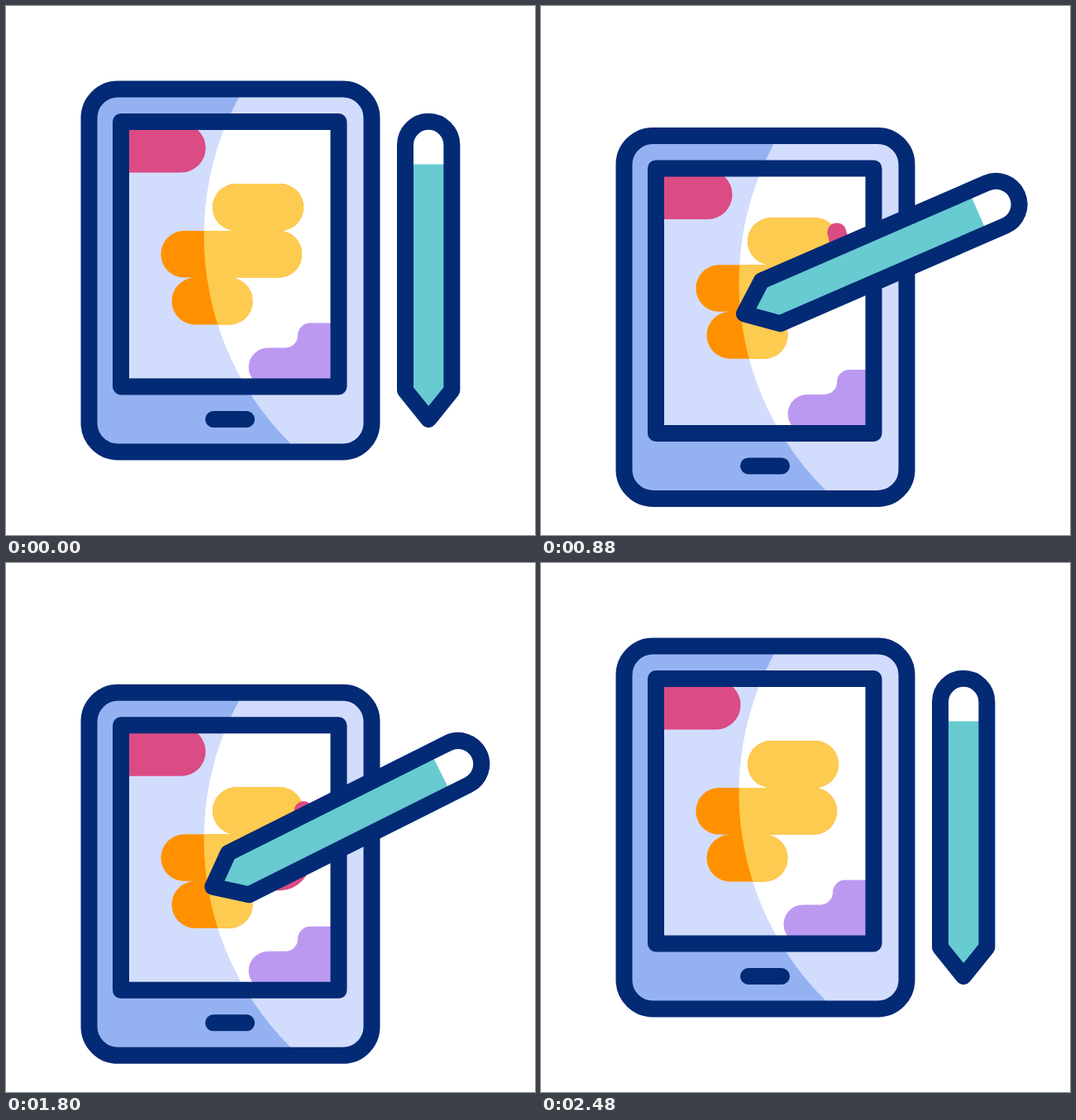
An HTML page that plays this animation: 640x640 px, repeating every 3 s.

```html
<!DOCTYPE html>
<html lang="en">
<head>
<meta charset="utf-8">
<title>Drawing tablet</title>
<style>
  html, body { margin: 0; width: 100%; height: 100%; overflow: hidden; background: #fff; }
  svg { display: block; width: 100vw; height: 100vh; }
  .line { fill: none; stroke: #032a75; stroke-width: 20; stroke-linecap: round; stroke-linejoin: round; }
</style>
</head>
<body>
<svg viewBox="0 0 640 640">
  <defs>
    <rect id="body" x="100.5" y="100.5" width="342" height="439" rx="35"/>
    <rect id="screen" x="139" y="140" width="263.5" height="320.5"/>
    <circle id="glare" cx="593.5" cy="278" r="354"/>
    <path id="blob" d="M360 243.5A28.5 28.5 0 0 0 331.5 215H278.5A28.5 28.5 0 0 0 278.5 272
      H214A28.3 28.3 0 0 0 214 328.5H229A28.5 28.5 0 0 0 229 385.5H270A28.5 28.5 0 0 0 270 328.5
      H331.5A28.3 28.3 0 0 0 331.5 272A28.5 28.5 0 0 0 360 243.5" pathLength="1"/>
    <path id="shell" d="M483 465V168a28.2 28.2 0 0 1 56.4 0V465L511.2 500Z"/>
    <clipPath id="inBody"><use href="#body"/></clipPath>
    <clipPath id="inScreen"><use href="#screen"/></clipPath>
    <clipPath id="inGlare"><use href="#glare"/></clipPath>
    <clipPath id="inShell"><use href="#shell"/></clipPath>
  </defs>

  <g id="tablet">
    <g clip-path="url(#inBody)">
      <use href="#body" fill="#94b2f2"/>
      <use href="#glare" fill="#d2dcfc"/>
    </g>
    <g clip-path="url(#inScreen)">
      <use href="#screen" fill="#d2dcfc"/>
      <use href="#glare" fill="#fff"/>
      <rect id="corner" x="90" y="142" width="151.5" height="59.5" rx="29.7" fill="#db4b84"/>
      <path id="hill" fill="#bc99f1" d="M430 383.5H368A15 15 0 0 0 353 398.5A15 15 0 0 1 338 413.5
        H317A23.5 23.5 0 0 0 317 460.5H430Z"/>
      <use class="art" href="#blob" fill="#ff9100"/>
      <g clip-path="url(#inGlare)"><use class="art" href="#blob" fill="#fdcb50"/></g>
      <use class="art" id="ink" href="#blob" fill="none" stroke="#db4b84" stroke-width="23"
        stroke-linecap="round" stroke-linejoin="round"/>
    </g>
    <use href="#screen" class="line"/>
    <use href="#body" class="line"/>
    <path class="line" d="M251 500H291"/>
  </g>

  <g id="pen">
    <use href="#shell" fill="#fff"/>
    <rect x="480" y="191.5" width="62" height="310" fill="#67cbd1" clip-path="url(#inShell)"/>
    <use href="#shell" class="line"/>
  </g>
</svg>
<script>
  const LOOP = 3000, STEP = 40;
  const $ = id => document.getElementById(id);
  const art = document.querySelectorAll('.art');
  const move = (el, x, y, more = '') => el.setAttribute('transform', `translate(${x} ${y}) ${more}`);

  // Smooth 0 to 1 between times a and b
  function ease(t, a, b) {
    const u = Math.min(1, Math.max(0, (t - a) / (b - a)));
    return u * u * (3 - 2 * u);
  }
  // Up during a..b, back down during c..d
  const swing = (t, a, b, c, d) => ease(t, a, b) - ease(t, c, d);

  function draw(t) {
    move($('tablet'), 0, 56.4 * swing(t, 200, 840, 1790, 2410));

    const slide = swing(t, 720, 1120, 1400, 1780);
    move($('corner'), -28.5 * slide, 0);
    move($('hill'), 14.5 * slide, 0);
    art.forEach(el => move(el, 0, -43 * slide));

    const from = ease(t, 1400, 1970), to = ease(t, 840, 1400);
    const ink = $('ink').style;
    ink.display = to > from ? '' : 'none';
    ink.strokeDasharray = `${to - from} 2`;
    ink.strokeDashoffset = -from;

    const tilt = swing(t, 200, 1040, 1618, 2400);
    const x = -116 * tilt + 22 * swing(t, 700, 1300, 1300, 1800);
    const y = -90 * swing(t, 700, 1300, 1300, 1920);
    move($('pen'), x, y, `rotate(${73.5 * tilt} 511.2 320)`);
  }

  const start = performance.now();
  function tick() {
    const t = (performance.now() - start) % LOOP;
    draw(Math.floor(t / STEP) * STEP);
    requestAnimationFrame(tick);
  }
  tick();
</script>
</body>
</html>
```
